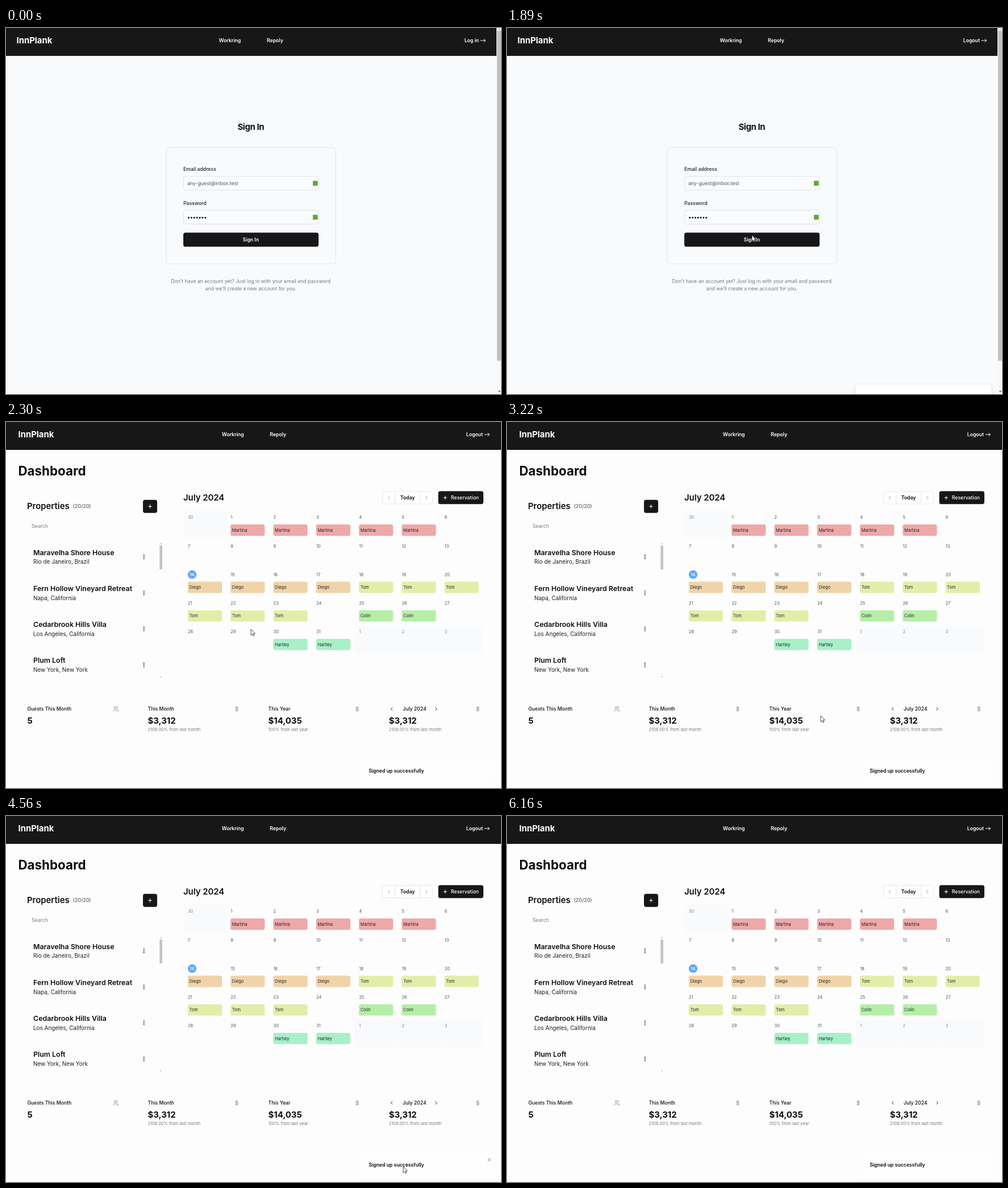
These frames come from a looping animation (871 px wide and 643 px high, 6.85 s). An HTML page:

```html
<!DOCTYPE html>
<html lang="en">
<head>
<meta charset="utf-8">
<title>Booking dashboard</title>
<style>
  html, body { margin: 0; width: 100%; height: 100%; overflow: hidden; background: #fdfdfd; }
  svg { display: block; width: 871px; height: 643px; }
  text { font-family: Inter, sans-serif; white-space: pre; }
  .card { filter: drop-shadow(0 .6px .8px rgba(0, 0, 0, .17)); }
  .toast { filter: drop-shadow(0 3px 3px rgba(0, 0, 0, .11)); }
</style>
</head>
<body>
<svg id="stage" viewBox="0 0 871 643" xmlns="http://www.w3.org/2000/svg"></svg>
<script>
const LOOP = 6850;
const INK = '#0b0d10', DARK = '#171717', GREY = '#737a83';
const SMALL = 8.68, TINY = 7.44, TITLE = 14.88;

const text = (x, y, str, size = SMALL, weight = 400, fill = INK, more = '') =>
  `<text x="${x}" y="${y}" font-size="${size}" font-weight="${weight}" fill="${fill}" ${more}>${str}</text>`;
const mid = (x, y, str, size, weight, fill, more = '') =>
  text(x, y, str, size, weight, fill, `text-anchor="middle" ${more}`);
const rect = (x, y, w, h, fill, r = 0, more = '') =>
  `<rect x="${x}" y="${y}" width="${w}" height="${h}" rx="${r}" fill="${fill}" ${more}/>`;
const line = (d, color, width = .8, more = '') =>
  `<path d="${d}" fill="none" stroke="${color}" stroke-width="${width}" stroke-linecap="round" stroke-linejoin="round" ${more}/>`;
const chevron = (x, y, dir, color, s = 2.4) =>
  line(`M${x - dir * s / 2} ${y - s}l${dir * s} ${s}l${-dir * s} ${s}`, color, .9);
const plus = (x, y) => line(`M${x - 2.9} ${y}h5.8M${x} ${y - 2.9}v5.8`, '#fff', 1);
const arrow = x => line(`M${x - 8.8} 22h8.4M${x - 3} 19.6l2.6 2.4l-2.6 2.4`, '#fff', 1);

function header(left, links, right, label, width) {
  return rect(0, 0, width, 49, DARK) +
    text(left, 26.6, 'InnPlank', TITLE, 700, '#fff') +
    text(links, 24.8, 'Workring', SMALL, 600, '#fff') +
    text(links + 84.4, 24.8, 'Repoly', SMALL, 600, '#fff') +
    text(right - 12, 24.8, label, SMALL, 600, '#fff', 'text-anchor="end"') + arrow(right);
}

function field(y, label) {
  return text(312, y - 9.2, label, SMALL, 500, '#1c2430') +
    rect(312.4, y + .5, 237.6, 24.2, '#f9fbfd', 3.7, 'stroke="#d9dee5" stroke-width=".8"') +
    rect(540, y + 8.5, 8.5, 8.5, '#62a832');
}

function signIn() {
  let out = rect(0, 0, 871, 643, '#f8fafc') +
    rect(863, 0, 8, 643, '#f8f8f9') + rect(864, 5, 7, 579.5, '#c1c1c1') +
    '<path d="M866 3.2l2-2.2l2 2.2z" fill="#a3a3a3"/><path d="M865.7 637.5h4.6l-2.3 2.5z" fill="#505050"/>' +
    `<g id="guest">${header(18.5, 374.6, 844, 'Log in', 863)}</g>` +
    `<g id="member">${header(18.5, 374.6, 844, 'Logout', 863)}</g>` +
    mid(430.8, 179.4, 'Sign In', TITLE, 700, INK, 'letter-spacing="-.37"') +
    rect(282.5, 210.5, 297, 203.3, '#f8fafc', 5, 'class="card"') +
    field(260, 'Email address') + field(319.7, 'Password') +
    text(319, 276.2, 'any-guest@inbox.test', SMALL, 400, '#50565f');
  for (let i = 0; i < 7; i++) out += `<circle cx="${321.6 + i * 4.86}" cy="333.2" r="1.45" fill="${INK}"/>`;
  return out + rect(312, 359.4, 238, 24.8, DARK, 3.7, 'id="submit"') +
    mid(430.8, 375, 'Sign In', SMALL, 600, '#fff') +
    mid(430.8, 448.2, 'Don’t have an account yet? Just log in with your email and password', SMALL, 400, GREY) +
    mid(430.8, 460.6, 'and we’ll create a new account for you.', SMALL, 400, GREY) +
    '<g id="toast">' +
    rect(612.8, 593.4, 240, 42.6, '#fff', 3.7, 'class="toast" stroke="#e2e8f0" stroke-width=".7"') +
    text(627.8, 617.8, 'Signed up successfully', SMALL, 600) + '</g>';
}

function properties() {
  const homes = [
    ['Maravelha Shore House', 'Rio de Janeiro, Brazil'],
    ['Fern Hollow Vineyard Retreat', 'Napa, California'],
    ['Cedarbrook Hills Villa', 'Los Angeles, California'],
    ['Plum Loft', 'New York, New York']
  ];
  let out = text(37, 153.4, 'Properties', TITLE, 600) +
    text(117.6, 151.2, '(20/20)', SMALL, 600, '#6b7280') +
    rect(241, 136.8, 25, 23, DARK, 3.7) + plus(253.5, 148.3) +
    text(45, 185.7, 'Search', SMALL, 400, GREY);
  homes.forEach(([name, place], i) => {
    const y = 233.5 + i * 63.3;
    out += text(48, y, name, 12.4, 600) + text(48, y + 15.8, place, 9.92, 400, '#1c2024');
    for (let k = -1; k < 2; k++) out += `<circle cx="242.7" cy="${y + 3.4 + k * 3.1}" r=".95" fill="${INK}"/>`;
  });
  return out + rect(270.3, 217, 4.6, 42, '#c4c4c4') +
    '<path d="M271 214.4l1.6-1.8l1.6 1.8z" fill="#aaa"/><path d="M271 447l1.6 1.8l1.6-1.8z" fill="#aaa"/>';
}

function calendar() {
  const cellX = i => 312.3 + (i % 7) * 75.3;
  const cellY = i => 155.5 + Math.floor(i / 7) * 50.2;
  // first cell, number of days, guest, colour
  const stays = [
    [1, 5, 'Martina', '#efa8a8'], [14, 4, 'Diego', '#f0d3a8'], [18, 3, 'Tom', '#e2eea8'],
    [21, 3, 'Tom', '#e2eea8'], [25, 2, 'Colin', '#b5efa7'], [30, 2, 'Hartley', '#a8f0c8']
  ];
  let out = text(312, 138, 'July 2024', TITLE, 600) +
    rect(662.4, 122, 88, 22, '#fff', 3.7, 'stroke="#dde1e7" stroke-width=".8"') +
    line('M684.8 122v22M728.4 122v22', '#dde1e7') +
    chevron(673.4, 133, -1, '#8d929a') + chevron(739.8, 133, 1, '#8d929a') +
    mid(706.5, 136.2, 'Today', SMALL, 600) +
    rect(760.6, 121.6, 79.4, 22.6, DARK, 3.7) + plus(772.8, 133) +
    text(782.8, 136.2, 'Reservation', SMALL, 500, '#fff');
  for (let i = 0; i < 35; i++) {
    const x = cellX(i), y = cellY(i), other = i === 0 || i > 31;
    if (other) out += rect(x + .5, y + .5, 74.8, 49.6, '#f8fafc');
    const day = i === 0 ? 30 : i > 31 ? i - 31 : i;
    if (i === 14) {
      out += `<circle cx="327.5" cy="268" r="7.6" fill="#60a5fa"/>` + mid(327.4, 270.7, day, TINY, 600, '#fff');
    } else out += text(x + 7.7, y + 14.8, day, TINY, 400, other ? '#7d848e' : '#4b515a');
  }
  for (const [first, days, guest, color] of stays) {
    for (let i = first; i < first + days; i++) {
      out += rect(cellX(i) + 7.5, cellY(i) + 24.6, 60.2, 19.9, color, 3) +
        text(cellX(i) + 10.2, cellY(i) + 37.2, guest, TINY, 400, '#20262b');
    }
  }
  return out;
}

function stats() {
  const cards = [
    ['Guests This Month', '5', ''],
    ['This Month', '$3,312', '2108.00% from last month'],
    ['This Year', '$14,035', '100% from last year'],
    ['July 2024', '$3,312', '2108.00% from last month']
  ];
  return cards.map(([label, value, note], i) => {
    const x = 37.4 + i * 212.1;
    const icon = i
      ? line('M5 0v9M7.4 1.8H3.8a1.3 1.3 0 0 0 0 2.7h2.4a1.3 1.3 0 0 1 0 2.7H2.3', '#737a83', .75, `transform="translate(${x + 151.5} 499.6)"`)
      : line('M6.3 8.7v-.9a2 2 0 0 0-2-2h-1.9a2 2 0 0 0-2 2v.9M5.2 2a1.9 1.9 0 1 1-3.8 0a1.9 1.9 0 1 1 3.8 0M8.9 8.7v-.9a2 2 0 0 0-1.4-1.9M6.3.2a1.9 1.9 0 0 1 0 3.6', '#737a83', .75, 'transform="translate(189 499.6)"');
    const nav = i === 3 ? chevron(678.6, 504, -1, INK) + chevron(757, 504, 1, INK) : '';
    return text(i === 3 ? 698 : x, 507.2, label, SMALL, 500) + nav + icon +
      text(x, 530, value, TITLE, 700) + text(x, 542.6, note, TINY, 400, GREY);
  }).join('');
}

function dashboard() {
  return rect(0, 0, 871, 643, '#fdfdfd') + header(21.5, 379.8, 851, 'Logout', 871) +
    text(21.5, 94.4, 'Dashboard', 22.32, 700) + properties() + calendar() + stats() +
    rect(624, 593.4, 229, 42.6, '#fefefe', 3.7) +
    text(638.2, 615.8, 'Signed up successfully', SMALL, 600) +
    line('M847.9 601.3l5.2 5.2M853.1 601.3l-5.2 5.2', '#666', .8, 'id="close"');
}

const pointer = `<path id="pointer" d="M0 0V10.6L2.4 8.4L4 12L5.7 11.2L4.1 7.7H7.4Z" fill="#fff" stroke="#111" stroke-width=".75" stroke-linejoin="round"/>`;
const hand = `<path id="hand" d="M1 .9C1-.1 2.8-.1 2.8 .9V4.6C3.2 4 4.4 4.2 4.5 4.9C5 4.4 6 4.6 6.1 5.3C6.7 4.9 7.6 5.2 7.6 6.1V9.4C7.6 11 6.8 11.5 6.7 13H2.4C2.2 11.4-.4 9.3-.9 7.7C-1.1 6.8 0 6.4 1 7.6Z" fill="#fff" stroke="#222" stroke-width=".6" stroke-linejoin="round"/>`;

document.getElementById('stage').innerHTML =
  `<g id="login">${signIn()}</g><g id="home">${dashboard()}</g>${pointer}${hand}`;

// Pointer moves: [time, x, y]
const moves = [
  [[430, 804, 630], [500, 715, 580], [563, 635, 530], [630, 560, 482], [697, 505, 448],
   [763, 470, 423], [900, 443, 391], [1000, 434, 374], [1100, 431, 364]],
  [[3020, 434, 367], [3160, 516, 475], [3290, 594, 564], [3390, 621, 612],
   [3500, 664, 631], [3600, 687, 631], [3690, 690, 621]],
  [[3760, 692, 616], [4000, 662, 617], [4290, 688, 616]],
  [[4500, 694, 616], [4560, 699, 616]],
  [[5830, 704, 617], [5960, 734, 623], [6090, 778, 634], [6160, 806, 650]]
];
const STEP = 1000 / 15;

function pointerAt(time) {
  const path = moves.filter(m => m[0][0] <= time).pop();
  if (!path) return null;
  const start = path[0][0], end = path[path.length - 1];
  if (time >= end[0]) return end.slice(1);
  const t = start + Math.floor((time - start + 5) / STEP) * STEP;
  const i = Math.max(1, path.findIndex(p => p[0] > t));
  const [a, b] = [path[i - 1], path[i]];
  const k = (t - a[0]) / (b[0] - a[0]);
  return [a[1] + (b[1] - a[1]) * k, a[2] + (b[2] - a[2]) * k];
}

const el = id => document.getElementById(id);
const show = (id, on) => el(id).setAttribute('display', on ? 'inline' : 'none');
const place = (id, x, y) => el(id).setAttribute('transform', `translate(${x} ${y})`);
const clamp = v => Math.max(0, Math.min(1, v));

function draw(t) {
  const home = t >= 2300, signed = t >= 1890;
  show('login', !home);
  show('home', home);
  show('guest', !signed);
  show('member', signed);
  show('toast', signed);
  const slide = clamp((t - 1860) / 160);
  place('toast', 0, 50 * (1 - slide) ** 2);

  const pos = pointerAt(t);
  const hover = !home && pos && pos[1] < 550 && pos[2] < 384;
  el('submit').setAttribute('fill', hover ? '#2f2f2f' : DARK);
  show('pointer', pos && !hover);
  show('hand', hover);
  if (pos) {
    place('pointer', pos[0], pos[1]);
    place('hand', pos[0], pos[1] + 1);
  }
  el('close').setAttribute('opacity', clamp((t - 3540) / 150) * clamp((6150 - t) / 100));
}

const began = performance.now();
function tick() {
  draw((performance.now() - began) % LOOP);
  requestAnimationFrame(tick);
}
tick();
</script>
</body>
</html>
```
